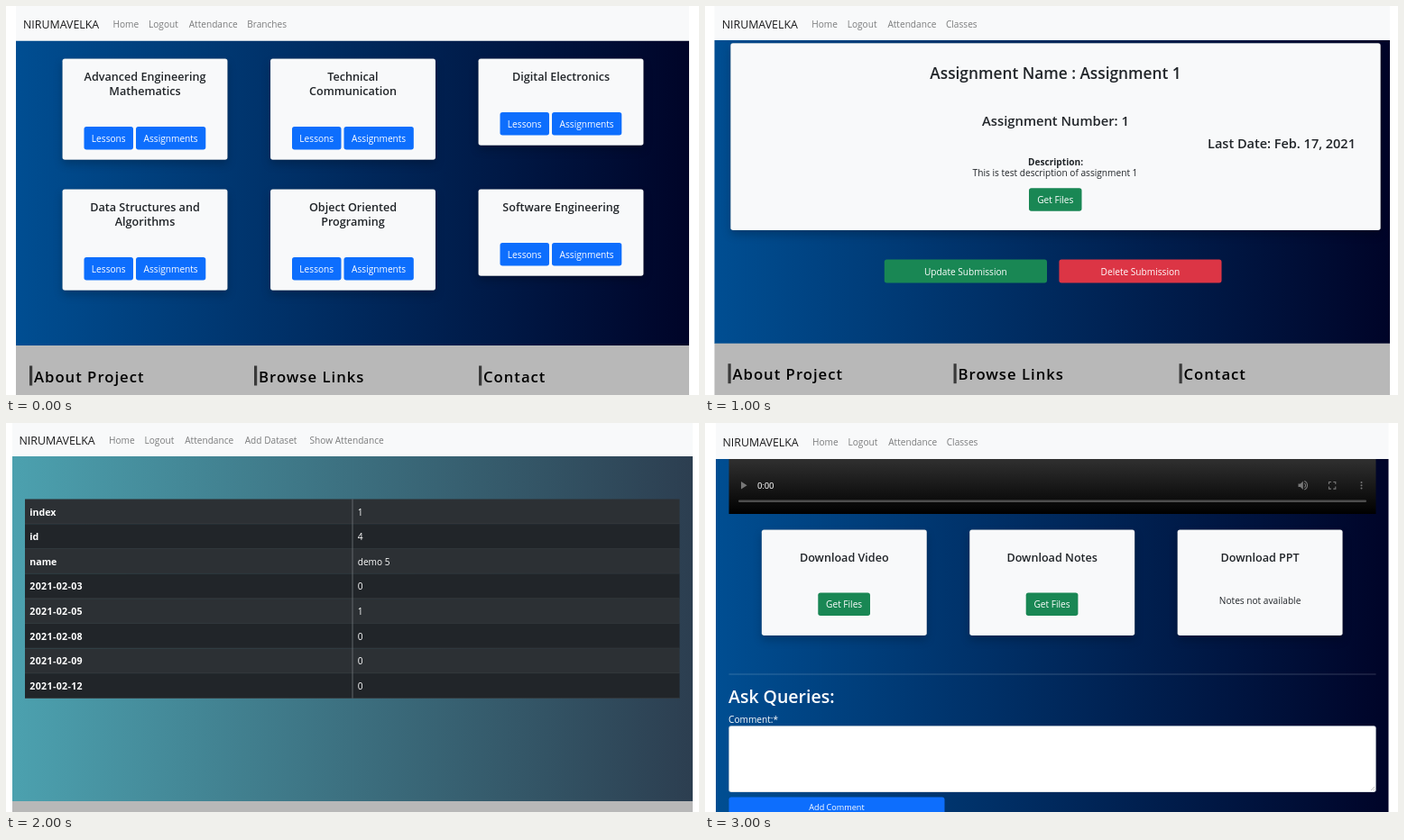
Write an HTML page that moves like this. It is 768 px wide and 432 px high and loops after 4 s.

```html
<!DOCTYPE html>
<html lang="en">
<head>
<meta charset="utf-8">
<title>Class portal</title>
<style>
  html, body { margin: 0; width: 100%; height: 100%; overflow: hidden; background: #fff; }
  svg { display: block; width: 768px; height: 432px; font-family: "Open Sans", "Noto Sans", sans-serif; }
  .card { fill: #f8f9fa; stroke: rgba(0,0,0,.125); stroke-width: .67; filter: drop-shadow(0 5px 5px rgba(0,0,0,.2)); }
</style>
</head>
<body>
<svg id="stage" viewBox="0 0 768 432">
  <defs>
    <linearGradient id="navy"><stop stop-color="#004e92"/><stop offset="1" stop-color="#000428"/></linearGradient>
    <linearGradient id="teal"><stop stop-color="#4ca1af"/><stop offset="1" stop-color="#2c3e50"/></linearGradient>
    <linearGradient id="player" x2="0" y2="1"><stop stop-color="#303030"/><stop offset="1" stop-color="#000"/></linearGradient>
  </defs>
</svg>
<script>
const INK = '#212529', BLUE = '#0d6efd', GREEN = '#198754', RED = '#dc3545';
const BODY = 10.15, TITLE = 12.6;

const rect = (x, y, x2, y2, fill, r = 0) =>
  `<rect x="${x}" y="${y}" width="${x2 - x}" height="${y2 - y}" rx="${r}" fill="${fill}"/>`;

const text = (x, y, s, { size = BODY, weight = 400, fill = INK, anchor = 'start', gap = 0 } = {}) =>
  `<text x="${x}" y="${y}" font-size="${size}" font-weight="${weight}" fill="${fill}" ` +
  `text-anchor="${anchor}" letter-spacing="${gap}">${s}</text>`;

const mid = (x, y, s, opts) => text(x, y, s, { anchor: 'middle', ...opts });
const heading = (x, y, s, size = TITLE) => mid(x, y, s, { size, weight: 600 });

const card = (x, y, x2, y2) =>
  `<rect class="card" x="${x}" y="${y}" width="${x2 - x}" height="${y2 - y}" rx="2.7"/>`;

const button = (x, y, x2, label, fill, h = 25.5) =>
  rect(x, y, x2, y + h, fill, 2.7) + mid((x + x2) / 2, y + h / 2 + 4, label, { fill: '#fff' });

// Page background and navigation bar
function page(left, right, navEnd, bottom, paint, base, links) {
  const [first, ...rest] = links;
  const xs = [0, 39.5, 84.2, 148.7, 150.5 + 70];
  return rect(left, navEnd, right, bottom, `url(#${paint})`) +
    rect(left, 0, right, navEnd, '#f8f9fa') +
    text(first, base + 1, 'NIRUMAVELKA', { size: 12.4, fill: '#1a1a1b' }) +
    ['Home', 'Logout', 'Attendance', ...rest]
      .map((s, i) => text(first + 99.5 + xs[i] + (i > 2 && rest.length > 1 ? 2 : 0), base, s, { fill: '#7b7c7d' }))
      .join('');
}

function footer(left, right, top, step) {
  return rect(left, top, right, 432, '#b8b8b8') +
    ['About Project', 'Browse Links', 'Contact'].map((s, i) => {
      const x = left + 15 + i * step;
      return rect(x, top + 22.5, x + 3.2, top + 44.5, '#3a3a3a') +
        text(x + 5, top + 40.5, s, { size: 16.7, weight: 600, fill: '#000', gap: 1 });
    }).join('');
}

function subjects() {
  const names = [
    ['Advanced Engineering', 'Mathematics'], ['Technical', 'Communication'], ['Digital Electronics'],
    ['Data Structures and', 'Algorithms'], ['Object Oriented', 'Programing'], ['Software Engineering']
  ];
  return page(11, 757, 38.5, 377, 'navy', 24, [19, 'Branches']) +
    names.map((lines, i) => {
      const c = 154 + i % 3 * 230.5, y = 58.5 + (i > 2 ? 145 : 0);
      const extra = (lines.length - 1) * 16;
      return card(c - 91.5, y, c + 91.5, y + 96.3 + extra) +
        lines.map((s, k) => heading(c, y + 24.5 + k * 16, s)).join('') +
        button(c - 67.5, y + 59.5 + extra, c - 13, 'Lessons', BLUE) +
        button(c - 10, y + 59.5 + extra, c + 67.3, 'Assignments', BLUE);
    }).join('') +
    footer(11, 757, 377, 249);
}

function assignment() {
  return page(10.5, 759, 38, 375, 'navy', 23.5, [18.7, 'Classes']) +
    card(28.3, 41.3, 748.7, 249) +
    heading(388.5, 81, 'Assignment Name : Assignment 1', 17.3) +
    heading(388.5, 133, 'Assignment Number: 1', 14.75) +
    heading(639, 157.5, 'Last Date: Feb. 17, 2021', 14.5) +
    mid(388.5, 176.5, 'Description:', { weight: 700 }) +
    mid(388, 189.3, 'This is test description of assignment 1') +
    button(359, 202.3, 417.5, 'Get Files', GREEN) +
    button(198.8, 281.5, 379, 'Update Submission', GREEN, 26) +
    button(392.4, 281.5, 572.5, 'Delete Submission', RED, 26) +
    footer(10.5, 759, 374.7, 250);
}

function attendance() {
  const rows = [
    ['index', 1], ['id', 4], ['name', 'demo 5'], ['2021-02-03', 0],
    ['2021-02-05', 1], ['2021-02-08', 0], ['2021-02-09', 0], ['2021-02-12', 0]
  ];
  const step = 27.65;
  return page(7, 761, 37, 420, 'teal', 22.5, [14.5, 'Add Dataset', 'Show Attendance'])  +
    rect(7, 420, 761, 432, '#b8b8b8') +
    rows.map(([key, value], i) => {
      const y = 84.5 + i * step;
      return rect(21, y, 746.5, y + step, i % 2 ? INK : '#2c3034') +
        rect(21, y + step - .7, 746.5, y + step, '#373b3e') +
        text(26.3, y + 18, key, { size: 10.6, weight: 700, fill: '#fff', gap: i > 2 ? .35 : 0 }) +
        text(389.7, y + 18, value, { fill: '#fff' });
    }).join('') +
    rect(383.6, 84.5, 384.4, 305.7, '#70757a');
}

function player() {
  return rect(26.5, 40, 743.5, 101, 'url(#player)') +
    '<path d="M40 65v8.6l6.6-4.3z" fill="#777"/>' +
    `<g font-family="Roboto, sans-serif">${text(58, 72.8, '0:00', { size: 9.6, fill: '#fff' })}</g>` +
    '<path d="M657.5 67.5h2.3l3-3v9.6l-3-3h-2.3z" fill="#777"/>' +
    '<path d="M664.2 67a2.6 2.6 0 0 1 0 4.6M664.2 64.6a5 5 0 0 1 0 9.4' +
    'M691.5 68v-2.5h2.5M696.3 65.5h2.5v2.5M698.8 70.6v2.5h-2.5M694 73.1h-2.5v-2.5" fill="none" stroke="#777" stroke-width="1.1"/>' +
    [66, 69.3, 72.6].map(y => `<circle cx="727.5" cy="${y}" r="1" fill="#777"/>`).join('') +
    rect(37, 85.4, 733, 87.9, '#4d4d4d', 1.2);
}

function lesson() {
  return page(12, 757.5, 40, 432, 'navy', 25, [19.5, 'Classes']) + player() +
    ['Video', 'Notes', 'PPT'].map((s, i) => {
      const c = 154.3 + i * 230.4;
      return card(c - 91.5, 118.6, c + 91.5, 236) +
        heading(c, 153.7, 'Download ' + s) +
        (i < 2 ? button(c - 29, 188.5, c + 28.7, 'Get Files', GREEN) : mid(c, 201, 'Notes not available'));
    }).join('') +
    rect(26.5, 278.6, 743.5, 279.4, 'rgba(255,255,255,.25)') +
    text(26, 311, 'Ask Queries:', { size: 19.5, weight: 600, fill: '#fff' }) +
    text(26, 332.5, 'Comment:*', { fill: '#fff' }) +
    rect(26.3, 336.3, 743.7, 410, '#ced4da', 2.7) +
    rect(27, 337, 743, 409.3, '#fff', 2.2) +
    '<path d="M738 408l4-4M740.5 408l1.5-1.5" stroke="#999" stroke-width=".6"/>' +
    rect(26.5, 415.5, 265.5, 441, BLUE, 2.7) +
    mid(146, 430, 'Add Comment', { size: 9.1, fill: '#fff' });
}

const stage = document.getElementById('stage');
const scenes = [subjects, assignment, attendance, lesson].map(draw => {
  const g = document.createElementNS('http://www.w3.org/2000/svg', 'g');
  g.innerHTML = draw();
  stage.append(g);
  return g;
});

const start = performance.now();
function tick() {
  const now = Math.floor((performance.now() - start) / 1000) % scenes.length;
  scenes.forEach((g, i) => g.style.display = i === now ? '' : 'none');
  requestAnimationFrame(tick);
}
tick();
</script>
</body>
</html>
```
